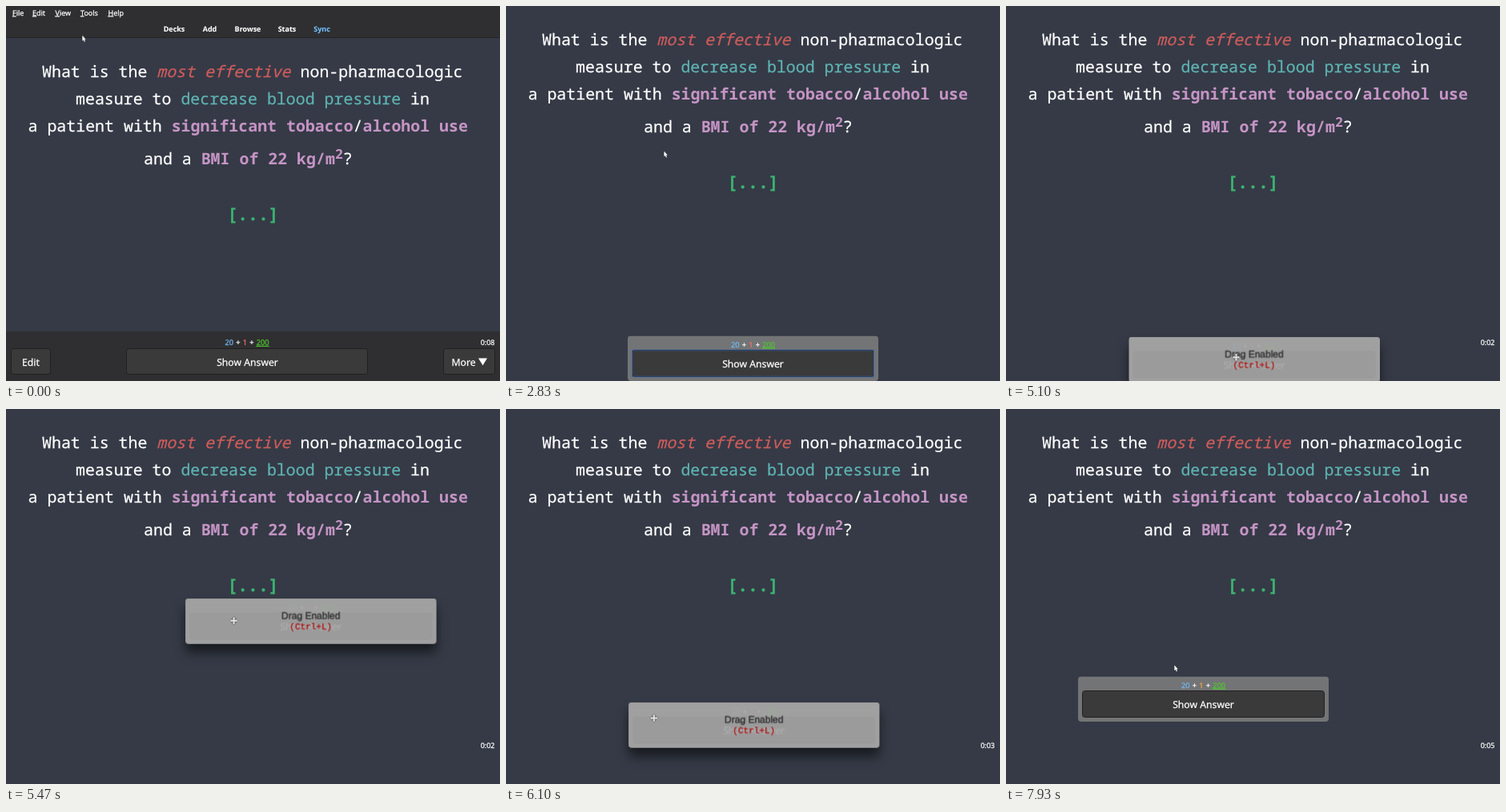
Animation of 617 by 469 pixels, one loop 8 s. Source, as an HTML page:

```html
<!DOCTYPE html>
<html lang="en">
<head>
<meta charset="utf-8">
<title>Full screen card review</title>
<style>
html, body { margin: 0; width: 100%; height: 100%; overflow: hidden; background: #353a46; }
svg { display: block; width: 617px; height: 469px; --c: #fff; }
text { font: 9px "Noto Sans", "Open Sans", sans-serif; text-rendering: geometricPrecision; }
text, tspan { fill: var(--c); stroke: var(--c); stroke-width: .25; }
.u { text-decoration: underline; }
.end { text-anchor: end; }
.nav text { font-weight: 700; text-anchor: middle; stroke-width: .1; }
.btn text { font-size: 12.2px; text-anchor: middle; }
.btn rect { fill: #3a3a3a; stroke: #202020; }
.count { font-size: 9.3px; word-spacing: .75px; text-anchor: middle; }
.new { --c: #6fb7f5; }
.learn { --c: #f0706c; }
.due { --c: #4fc52f; text-decoration: underline; }
.sync { --c: #74bdfb; }
.card text { font: 19.92px "Noto Sans Mono", "DejaVu Sans Mono", monospace; }
.card .red { --c: #cd5c5c; font-style: italic; }
.card .teal { --c: #5fb3b3; }
.card .mauve { --c: #c594c5; font-weight: 700; stroke-width: 0; }
.card .sup { font-size: 16.6px; }
.card .cloze { --c: #3cb371; font-size: 21.5px; font-weight: 700; text-anchor: middle; }
.panel { fill: #363636; stroke: #1c1c1c; }
.hl { fill: #4a6073; stroke: #5f8db0; }
.box { fill: #2b2b2b; stroke: #222; }
.rule { stroke: #232323; }
.tri { fill: #aaa; }
.dim { --c: #d8d8d8; }
.focus { fill: none; stroke: #3565ae; }
.drag { --c: #2e2e2e; font: 12px "Liberation Sans", Arial, sans-serif; text-anchor: middle; stroke-width: .35; }
.key { --c: #b00808; font: 11px "Liberation Mono", monospace; text-anchor: middle; }
.shadow { fill: #a0a0a0; filter: drop-shadow(0 11px 7px rgba(0,0,0,.55)); }
.cursor path { fill: #fff; stroke: #111; stroke-width: .8; paint-order: stroke; }

/* hard switches */
.a { animation: 8s step-end infinite; }
.window { animation-name: window; }
.full { animation-name: full; }
.card { animation-name: card; }
.view { animation-name: view; }
.entry { animation-name: entry; }
.sub { animation-name: sub; }
.toggle { animation-name: toggle; }
.pressed { animation-name: pressed; }
.unfocus { animation-name: unfocus; }
.clock { animation-name: clock; }
.late { animation-name: late; }
.sec { animation-name: sec; animation-delay: calc(var(--s) * 1ms - 8000ms); }
.context { animation-name: context; }
.pick { animation-name: pick; }
.arrow { animation-name: arrow; }
.cross { animation-name: cross; }
.tint { animation-name: tint; }
@keyframes window { 0% { opacity: 1 } 30.9%, 100% { opacity: 0 } }
@keyframes full { 0% { opacity: 0 } 30.9%, 100% { opacity: 1 } }
@keyframes card { 0% { transform: none } 30.9%, 100% { transform: translateY(-40px) } }
@keyframes view { 0% { opacity: 0 } 7.1% { opacity: 1 } 22.9%, 100% { opacity: 0 } }
@keyframes entry { 0% { opacity: 0 } 10%, 100% { opacity: 1 } }
@keyframes sub { 0% { opacity: 0 } 13.5%, 100% { opacity: 1 } }
@keyframes toggle { 0% { opacity: 0 } 18.3%, 100% { opacity: 1 } }
@keyframes pressed { 0% { opacity: 0 } 7.1%, 100% { opacity: 1 } }
@keyframes unfocus { 0% { opacity: 1 } 44.1%, 100% { opacity: 0 } }
@keyframes clock { 0% { opacity: 0 } 36.5%, 100% { opacity: 1 } }
@keyframes late { 0% { opacity: 0 } 16.25%, 100% { opacity: 1 } }
@keyframes sec { 0% { opacity: 1 } 12.5%, 100% { opacity: 0 } }
@keyframes context {
  0% { opacity: 0; transform: translate(212px, 235px) }
  44.1% { opacity: 1; transform: translate(212px, 235px) }
  52.1% { opacity: 0; transform: translate(165px, 259px) }
  87.9% { opacity: 1; transform: translate(165px, 259px) }
  95.4%, 100% { opacity: 0; transform: translate(165px, 259px) }
}
@keyframes pick { 0% { opacity: 0 } 48.5% { opacity: 1 } 60% { opacity: 0 } 91.5%, 100% { opacity: 1 } }
@keyframes arrow { 0% { opacity: 1 } 60% { opacity: 0 } 80.6%, 100% { opacity: 1 } }
@keyframes cross { 0% { opacity: 0 } 60% { opacity: 1 } 80.6%, 100% { opacity: 0 } }
@keyframes tint { 0% { fill: #f0706c; stroke: #f0706c } 95.4%, 100% { fill: #f0a040; stroke: #f0a040 } }

/* motion */
.bar { animation: bar 8s linear infinite; }
.veil { animation: veil 8s linear infinite; }
.cursor { animation: cursor 8s linear infinite; }
@keyframes veil { 0%, 52.2% { opacity: 0 } 56%, 95.4% { opacity: 1 } 98%, 100% { opacity: 0 } }
@keyframes bar {
  0%, 61.2% { transform: translate(152px, 412.5px) }
  62.5%, 65.4% { transform: translate(153.5px, 414px) }
  66.9% { transform: translate(215px, 330px) }
  68.5% { transform: translate(225px, 230px) }
  70.2% { transform: translate(140px, 240px) }
  72.5% { transform: translate(80.5px, 327.5px) }
  74.1% { transform: translate(188px, 359px) }
  76% { transform: translate(170px, 368px) }
  78% { transform: translate(42px, 360px) }
  80.2%, 100% { transform: translate(90px, 334.5px) }
}
@keyframes cursor {
  0%, .9% { transform: translate(95px, 36.5px); animation-timing-function: ease-out }
  5.4%, 7.1% { transform: translate(82px, 16px) }
  11.2% { transform: translate(110px, 26px) }
  17.1% { transform: translate(124px, 23px) }
  17.8% { transform: translate(178px, 23px) }
  19.6%, 30% { transform: translate(205px, 25px) }
  35.4% { transform: translate(197px, 181.5px); animation-timing-function: ease-out }
  39.1%, 45% { transform: translate(212px, 235px); animation-timing-function: ease-in-out }
  50%, 52.5% { transform: translate(257px, 297px); animation-timing-function: ease-in-out }
  60%, 63.75% { transform: translate(287px, 440px) }
  65.3% { transform: translate(349px, 356px) }
  66.9% { transform: translate(359px, 256px) }
  68.6% { transform: translate(274px, 266px) }
  70.9% { transform: translate(215px, 354px) }
  72.5% { transform: translate(322.5px, 385px) }
  74.4% { transform: translate(304px, 394px) }
  76.4% { transform: translate(176px, 386px) }
  78.6%, 80.2% { transform: translate(224px, 361px); animation-timing-function: ease-out }
  83.3%, 88.7% { transform: translate(165px, 258.5px); animation-timing-function: ease-in-out }
  92.9%, 100% { transform: translate(210px, 320px) }
}
</style>
</head>
<body>
<svg viewBox="0 0 617 469">
  <rect width="617" height="469" fill="#353a46"/>

  <g class="a card">
    <text x="45" y="89">What is the <tspan class="red">most effective</tspan> non-pharmacologic</text>
    <text x="87" y="123">measure to <tspan class="teal">decrease blood pressure</tspan> in</text>
    <text x="27.5" y="157">a patient with <tspan class="mauve">significant tobacco</tspan>/<tspan class="mauve">alcohol use</tspan></text>
    <text x="172" y="198">and a <tspan class="mauve">BMI of 22 kg/m</tspan><tspan class="mauve sup" dy="-7">2</tspan><tspan dy="7">?</tspan></text>
    <text class="cloze" x="308.5" y="267.5">[...]</text>
  </g>

  <!-- windowed mode -->
  <g class="a window">
    <rect width="617" height="40" fill="#2f2f31"/>
    <path class="rule" d="M0 39.5H617"/>
    <rect y="407" width="617" height="62" fill="#2f2f31"/>
    <rect class="a pressed hl" x="58.5" y="-.5" width="26" height="16"/>
    <text x="8" y="11.5"><tspan class="u">F</tspan>ile</text>
    <text x="33" y="11.5"><tspan class="u">E</tspan>dit</text>
    <text x="61.5" y="11.5"><tspan class="u">V</tspan>iew</text>
    <text x="93" y="11.5"><tspan class="u">T</tspan>ools</text>
    <text x="127.5" y="11.5"><tspan class="u">H</tspan>elp</text>
    <g class="nav">
      <text x="210" y="32">Decks</text>
      <text x="254.5" y="32">Add</text>
      <text x="302" y="32">Browse</text>
      <text x="351" y="32">Stats</text>
      <text class="sync" x="394.5" y="32">Sync</text>
    </g>
    <text class="count" x="301" y="424"><tspan class="new">20</tspan> + <tspan class="learn">1</tspan> + <tspan class="due">200</tspan></text>
    <g class="btn">
      <rect x="6.5" y="428.5" width="49" height="32" rx="3"/>
      <rect x="150.5" y="428.5" width="301" height="32" rx="3"/>
      <rect x="546.5" y="428.5" width="64" height="32" rx="3"/>
      <text x="31" y="449.5">Edit</text>
      <text x="301.5" y="449.5">Show Answer</text>
      <text x="571.5" y="449.5">More</text>
      <path d="M590 440.5h11l-5.5 9z" fill="#fff"/>
    </g>
    <rect class="a pressed focus" x="150.5" y="428.5" width="301" height="32"/>
    <text class="a sec end" style="--s:7300" x="610.5" y="424">0:08</text>
    <text class="a sec end" style="--s:300" x="610.5" y="424">0:09</text>
    <text class="a late end" x="610.5" y="424">0:10</text>

    <g class="a view">
      <rect class="panel" x="58.5" y="16.5" width="120" height="39"/>
      <rect class="a entry hl" x="58.5" y="17.5" width="120" height="18"/>
      <text x="81" y="30">ND Full Screen</text>
      <text x="81" y="49.5"><tspan class="u">Z</tspan>oom</text>
      <path class="tri" d="M171 24v6l3-3zM171 43v6l3-3z"/>
      <g class="a sub">
        <rect class="panel" x="178.5" y="16.5" width="235" height="238"/>
        <rect class="a toggle hl" x="179.5" y="17.5" width="233" height="18"/>
        <path class="rule" d="M180 74.5H413M245 121.5H413M264 210.5H413"/>
        <circle cx="190.5" cy="65" r="2.2" fill="#fff"/>
        <g class="box">
          <rect x="185.5" y="80.5" width="10" height="10"/>
          <rect x="185.5" y="99.5" width="10" height="10"/>
          <rect x="185.5" y="131.5" width="10" height="10"/>
          <rect x="185.5" y="150.5" width="10" height="10"/>
          <rect x="185.5" y="170.5" width="10" height="10"/>
        </g>
        <path d="M187.5 175.5l2.3 3 4-6" fill="none" stroke="#fff" stroke-width="1.5"/>
        <text x="201" y="30">Toggle No Distractions</text>
        <text class="end" x="401" y="30">F11</text>
        <text x="214" y="49.5">Full Screen Mode</text>
        <text x="214" y="68.5">Windowed Mode</text>
        <text x="201" y="89.5">Enable No Distractions Answer Bar</text>
        <text class="dim" x="212" y="109">Disable Answer Confirmation</text>
        <text x="182" y="125">Quick Settings</text>
        <text x="201" y="141">Auto-Toggle when Reviewing</text>
        <text x="201" y="160">Always On Top (Windowed mode)</text>
        <text x="201" y="179">Enable Idle Cursor Hide</text>
        <text x="201" y="198.5">Answer Button Visibility</text>
        <path class="tri" d="M405.5 192v6l3-3z"/>
        <text x="182" y="214.5">Advanced Settings</text>
        <text x="201" y="230.5">General Settings (Config)</text>
        <text x="201" y="249.5">ND Answer Bar Appearance Settings</text>
      </g>
    </g>
  </g>

  <!-- full screen mode -->
  <g class="a full">
    <g class="a clock">
      <text class="a sec end" style="--s:2660" x="610.5" y="423.5">0:00</text>
      <text class="a sec end" style="--s:3660" x="610.5" y="423.5">0:01</text>
      <text class="a sec end" style="--s:4660" x="610.5" y="423.5">0:02</text>
      <text class="a sec end" style="--s:5660" x="610.5" y="423.5">0:03</text>
      <text class="a sec end" style="--s:6660" x="610.5" y="423.5">0:04</text>
      <text class="a sec end" style="--s:7660" x="610.5" y="423.5">0:05</text>
    </g>
    <g class="bar">
      <rect class="veil shadow" width="313" height="56.5" rx="4"/>
      <rect width="313" height="56.5" rx="4" fill="#737475"/>
      <text class="count" x="156.5" y="14"><tspan class="new">20</tspan> + <tspan class="a tint">1</tspan> + <tspan class="due">200</tspan></text>
      <g class="btn">
        <rect x="5.5" y="18" width="302" height="33" rx="3"/>
        <text x="156.5" y="39.5">Show Answer</text>
      </g>
      <rect class="a unfocus focus" x="5.5" y="18" width="302" height="33"/>
      <g class="veil">
        <rect width="313" height="56.5" rx="4" fill="#a4a4a4" fill-opacity=".92"/>
        <text class="drag" x="156.5" y="25.5">Drag Enabled</text>
        <text class="key" x="156.5" y="38">(Ctrl+L)</text>
      </g>
    </g>
    <g class="a context">
      <rect class="panel" x=".5" y=".5" width="223" height="112"/>
      <rect class="a pick hl" x="1.5" y="59.5" width="221" height="18"/>
      <path class="rule" d="M1 85.5H223"/>
      <circle cx="11" cy="48.5" r="2.2" fill="#fff"/>
      <rect class="box" x="6.5" y="63.5" width="10" height="10"/>
      <text x="22" y="14">Toggle No Distractions</text>
      <text class="end" x="212" y="14">F11</text>
      <text x="35" y="33">Full Screen Mode</text>
      <text x="35" y="52">Windowed Mode</text>
      <text x="22" y="72">Enable Answer Bar Dragging</text>
      <text class="end" x="212" y="72">Ctrl+L</text>
      <text x="22" y="102">Reset Answer Bar Position</text>
    </g>
  </g>

  <g class="cursor">
    <path class="a arrow" d="M.3.3V7.3L1.8 6 2.9 8.4 4 7.9 3 5.5H5z"/>
    <path class="a cross" d="M0-4.8 2-2.6H.7V-.7H2.6V-2L4.8 0 2.6 2V.7H.7V2.6H2L0 4.8-2 2.6H-.7V.7H-2.6V2L-4.8 0-2.6-2V-.7H-.7V-2.6H-2z"/>
  </g>
</svg>
</body>
</html>
```
